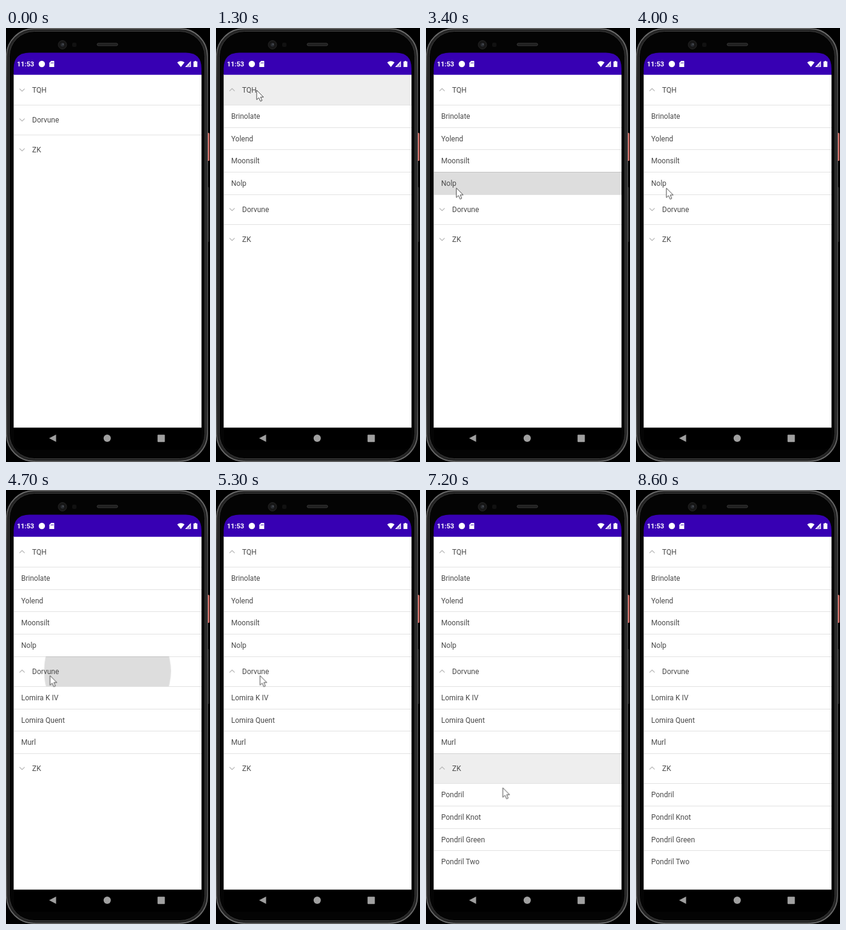
An HTML page that plays this animation: 336x712 px, repeating every 9500 ms.

```html
<!DOCTYPE html>
<html lang="en">
<head>
<meta charset="utf-8">
<title>Expandable list</title>
<style>
html, body { margin: 0; width: 100%; height: 100%; overflow: hidden; background: #000; }
.stage { position: relative; width: 336px; height: 712px; overflow: hidden; font: 12px Roboto, sans-serif; }
.stage > svg { position: absolute; left: 0; top: 0; }

.list { position: absolute; left: 13px; top: 77px; width: 309px; height: 578px; overflow: hidden; color: #4b4b4b; }
.group { --o: 0; animation: 9.5s step-end infinite; }
.group:nth-child(1) { animation-name: open1; }
.group:nth-child(2) { animation-name: open2; }
.group:nth-child(3) { animation-name: open3; }
.kids { height: calc(var(--o) * var(--n) * 36.8px); overflow: hidden; }

.row { position: relative; height: 36.8px; line-height: 39px; padding-left: 12px; overflow: hidden; white-space: nowrap; }
.row.head { height: 48.8px; line-height: 50.4px; padding-left: 30px; }
.row::before { content: ""; position: absolute; left: 0; right: 0; top: 0; height: 1px; background: #e2e2e2; }
.group:first-child > .head::before { display: none; }
.row span { position: relative; }
.row svg { position: absolute; left: 8px; top: 20px; transform: scaleY(calc(1 - 2 * var(--o))); }

/* touch ripple: starts under the pointer, slides to the row centre, then fades */
.row i { position: absolute; left: -6.3px; top: 50%; width: 320px; height: 320px; margin-top: -160px; border-radius: 50%;
  background: #000; opacity: 0; animation: ripple 9.5s linear var(--at) infinite; }

.cursor { animation: move 9.5s linear infinite; }

@keyframes open1 { 0% { --o: 0 } 9.474%, 100% { --o: 1 } }
@keyframes open2 { 0% { --o: 0 } 48.421%, 100% { --o: 1 } }
@keyframes open3 { 0% { --o: 0 } 71.579%, 100% { --o: 1 } }

@keyframes ripple {
  0% { opacity: .137; transform: translateX(var(--x)) scale(.25) }
  1.053% { transform: scale(.65) }
  1.579% { transform: scale(.79) }
  2.368% { transform: scale(1) }
  2.632% { opacity: .137 }
  5.789%, 100% { opacity: 0; transform: scale(1) }
}

@keyframes move {
  0% { transform: translate(67px, 82px); opacity: 0; animation-timing-function: step-end }
  8.421% { transform: translate(67px, 82px); opacity: 1 }
  9.474%, 17.895% { transform: translate(67px, 102px) }
  17.895% { animation-timing-function: steps(4) }
  22.105%, 25.263% { transform: translate(54px, 242px) }
  26.316%, 29.474% { transform: translate(50px, 248px) }
  31.579%, 42.105% { transform: translate(50px, 262.5px) }
  42.105% { animation-timing-function: steps(4) }
  46.316%, 58.947% { transform: translate(72.5px, 304.5px) }
  58.947% { animation-timing-function: steps(4) }
  63.158%, 67.368% { transform: translate(48px, 334.5px) }
  67.368% { animation-timing-function: steps(3) }
  70.526%, 73.684% { transform: translate(106px, 455px) }
  75.789%, 77.895% { transform: translate(126.5px, 488.5px) }
  80% { transform: translate(122px, 506px) }
  84.211% { transform: translate(160px, 450px) }
  87.368% { transform: translate(196px, 388px) }
  89.474% { transform: translate(206px, 402px); opacity: 1; animation-timing-function: step-end }
  90.526%, 100% { transform: translate(206px, 402px); opacity: 0 }
}
</style>
</head>
<body>
<div class="stage">
  <svg width="336" height="712" viewBox="0 0 336 712">
    <defs>
      <linearGradient id="rim" x2="0" y2="1">
        <stop offset="0" stop-color="#707070"/>
        <stop offset=".12" stop-color="#4c4c4c"/>
        <stop offset=".85" stop-color="#484848"/>
        <stop offset="1" stop-color="#707070"/>
      </linearGradient>
    </defs>
    <!-- body -->
    <rect x="331" y="172" width="4" height="46" rx="1.5" fill="#e0736b"/>
    <rect x="331" y="261" width="4" height="90" rx="1.5" fill="#1d1d1d"/>
    <rect x=".8" y="1.2" width="331" height="709.6" rx="45" fill="#242424" stroke="url(#rim)" stroke-width="1.8"/>
    <rect x="5.5" y="5.5" width="322" height="701" rx="41" fill="#040404" stroke="#3c3c3c"/>
    <path d="M48 710.8H284" stroke="#606060" stroke-width="1.6"/>
    <!-- camera and speaker -->
    <circle cx="93" cy="27.5" r="7" fill="#171717" stroke="#242424"/>
    <circle cx="93" cy="27.5" r="3" fill="#2b2e33"/>
    <circle cx="94" cy="26.5" r="1" fill="#5c6168"/>
    <rect x="109" y="24" width="7" height="7" rx="2" fill="#111"/>
    <rect x="150" y="25" width="34" height="4" rx="2" fill="#1e1e1e" stroke="#383838"/>
    <!-- screen and status bar -->
    <rect x="12.6" y="76" width="309.4" height="579.8" fill="#fff"/>
    <path d="M12.6 76.7V66.5Q12.6 40.5 38.6 40.5H296Q322 40.5 322 66.5V76.7Z" fill="#3700b3"/>
    <g fill="#fff">
      <text x="18" y="63" font-family="Roboto, sans-serif" font-size="11" font-weight="700">11:53</text>
      <circle cx="59" cy="59" r="5.2"/>
      <path d="M74.4 54H79.4V64H71.4V57Z"/>
      <path d="M282 56.6Q288 51.8 294 56.6L288 64Z"/>
      <path d="M304.5 54V64H295Z"/>
      <path d="M310.7 54H313.3V55H315.2V64H308.8V55H310.7Z"/>
    </g>
    <path d="M74 56.5V58.5M75.7 56V58.5M77.4 56V58.5" stroke="#3700b3" stroke-width=".7"/>
    <path d="M302.5 58.5V62.5H298.5" fill="none" stroke="#3700b3" stroke-width=".8"/>
    <!-- navigation bar -->
    <path d="M13 655.8H322V676Q322 692 306 692H29Q13 692 13 676Z" fill="#000"/>
    <g fill="#a0a0a0">
      <path d="M71 673L82.5 667V679Z"/>
      <circle cx="166.7" cy="673" r="6"/>
      <rect x="249.6" y="667.2" width="12" height="12" rx="1"/>
    </g>
  </svg>

  <div class="list">
    <section class="group" style="--n:4">
      <div class="row head" style="--at:.9s;--x:-100px"><i></i><svg width="11" height="9"><path d="M1.3 2.6L5.5 6.6L9.7 2.6" fill="none" stroke="#b4b4b4" stroke-width="1.2"/></svg><span>TQH</span></div>
      <div class="kids">
        <div class="row"><span>Brinolate</span></div>
        <div class="row"><span>Yolend</span></div>
        <div class="row"><span>Moonsilt</span></div>
        <div class="row" style="--at:3.15s;--x:-117px"><i></i><span>Nolp</span></div>
      </div>
    </section>
    <section class="group" style="--n:3">
      <div class="row head" style="--at:4.6s;--x:-95px"><i></i><svg width="11" height="9"><path d="M1.3 2.6L5.5 6.6L9.7 2.6" fill="none" stroke="#b4b4b4" stroke-width="1.2"/></svg><span>Dorvune</span></div>
      <div class="kids">
        <div class="row" style="--at:6.05s;--x:-119px"><i></i><span>Lomira K IV</span></div>
        <div class="row"><span>Lomira Quent</span></div>
        <div class="row"><span>Murl</span></div>
      </div>
    </section>
    <section class="group" style="--n:4">
      <div class="row head" style="--at:6.8s;--x:-61px"><i></i><svg width="11" height="9"><path d="M1.3 2.6L5.5 6.6L9.7 2.6" fill="none" stroke="#b4b4b4" stroke-width="1.2"/></svg><span>ZK</span></div>
      <div class="kids">
        <div class="row"><span>Pondril</span></div>
        <div class="row"><span>Pondril Knot</span></div>
        <div class="row"><span>Pondril Green</span></div>
        <div class="row"><span>Pondril Two</span></div>
      </div>
    </section>
  </div>

  <svg width="336" height="712" viewBox="0 0 336 712">
    <path class="cursor" d="M0 0V15.6L3.6 12.4L6.2 18.2L8.9 17L6.4 11.3H11.2Z" fill="#fff" stroke="#333" stroke-width=".9" stroke-linejoin="round"/>
  </svg>
</div>
</body>
</html>
```
